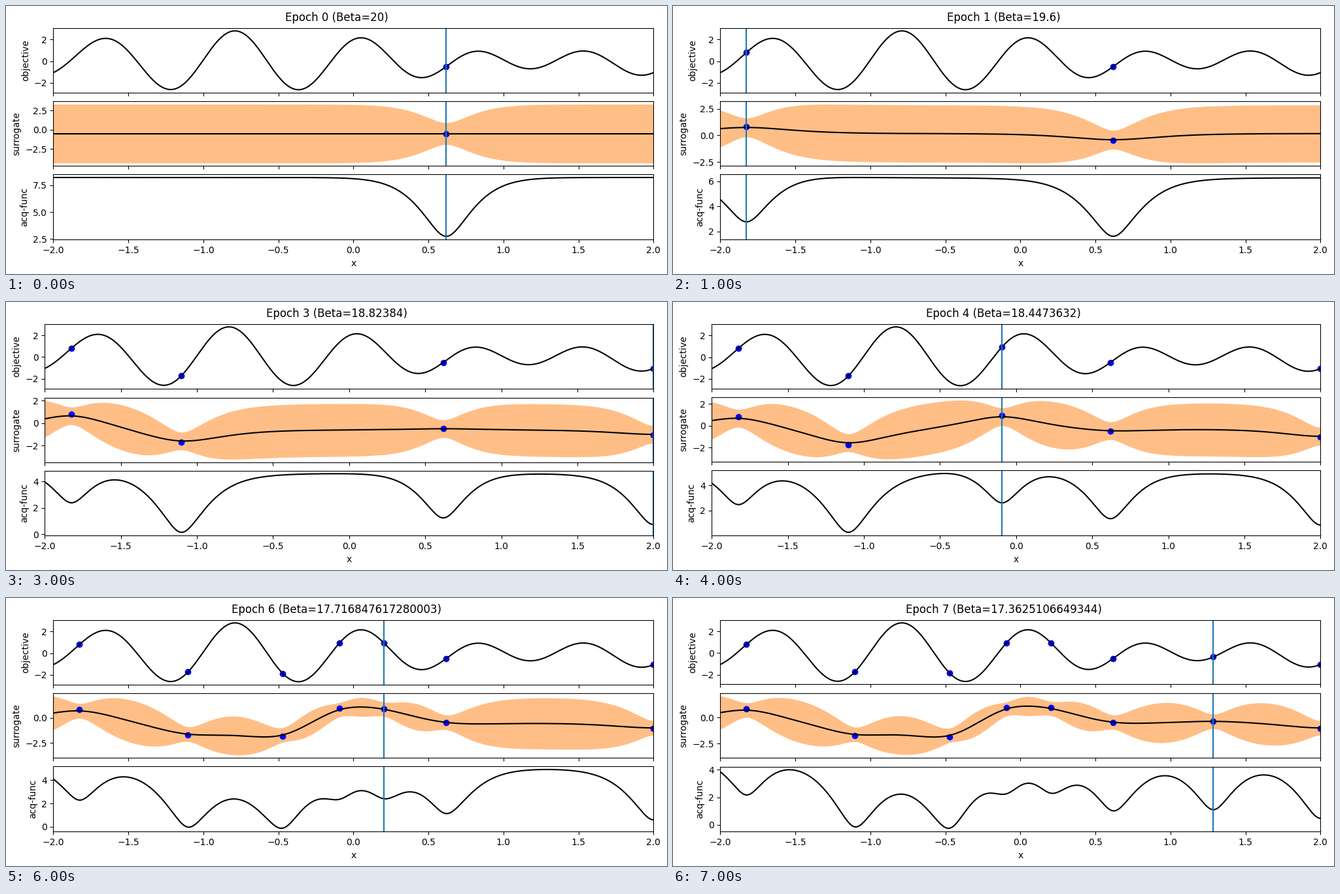
Write a matplotlib script that moves like this. It is 1011 by 411 pixels and loops after 8000 ms.

```python
import numpy as np
import matplotlib.pyplot as plt
from matplotlib.animation import FuncAnimation

W, H, DPI = 1011, 411, 100
EPOCHS = 8
grid = np.linspace(-2, 2, 1000)
samples = np.array([0.6187, -1.8257, -1.1024, 2.0, -0.092, -0.4706, 0.2048, 1.2854])


def objective(x):
    return np.sin(2 * np.pi * x) + np.cos(7.275 * x) + np.cos(8.285 * x)


def matern(a, b, length):
    r = np.sqrt(5) * np.abs(a[:, None] - b[None, :]) / length
    return (1 + r + r * r / 3) * np.exp(-r)


def solve_gp(params, x, y):
    """Noisy covariance and best constant mean for log hyperparameters."""
    scale, length, noise = np.exp(params)
    cov = scale * matern(x, x, length) + noise * np.eye(len(x))
    weights = np.linalg.solve(cov, np.ones(len(x)))
    return cov, weights @ y / weights.sum()


def log_posterior(params, x, y):
    cov, mean = solve_gp(params, x, y)
    scale, length, noise = np.exp(params)
    res = y - mean
    fit = -0.5 * (res @ np.linalg.solve(cov, res) + np.linalg.slogdet(cov)[1])
    # Gamma priors on scale, length and noise
    prior = (params[0] - 0.15 * scale + 2 * params[1] - 6 * length
             + 0.1 * params[2] - 0.05 * noise)
    return fit + prior


def fit_gp(x, y):
    """Compass search for the most probable hyperparameters."""
    best = np.log([2.0, 0.4, 0.5])
    score = log_posterior(best, x, y)
    step = 0.4
    while step > 2e-4:
        improved = False
        for move in np.vstack([np.eye(3), -np.eye(3)]) * step:
            trial = log_posterior(best + move, x, y)
            if trial > score:
                best, score, improved = best + move, trial, True
        if not improved:
            step /= 2
    return best


def posterior(x, y):
    params = fit_gp(x, y)
    cov, mean = solve_gp(params, x, y)
    scale, length, _ = np.exp(params)
    cross = scale * matern(grid, x, length)
    mu = mean + cross @ np.linalg.solve(cov, y - mean)
    var = scale - np.sum(cross * np.linalg.solve(cov, cross.T).T, axis=1)
    return mu, np.sqrt(var)


values = objective(samples)
models = [posterior(samples[:n], values[:n]) for n in range(1, EPOCHS + 1)]
betas = [20]
while len(betas) < EPOCHS:
    betas.append(betas[-1] * 0.98)

# Area for the three panels, in pixels; the title sits above it
LEFT, BOTTOM, WIDTH, TOP = 5.5, 5.17, 1000, 29.5
TITLE_BASELINE = 23

fig = plt.figure(figsize=(W / DPI, H / DPI), dpi=DPI, layout="constrained")
fig.get_layout_engine().set(
    rect=(LEFT / W, BOTTOM / H, WIDTH / W, (H - TOP - BOTTOM) / H))


def draw(epoch):
    fig.clear()
    fig.suptitle(f"Epoch {epoch} (Beta={betas[epoch]})", va="baseline",
                 x=(LEFT + WIDTH / 2) / W, y=1 - TITLE_BASELINE / H)
    top, middle, bottom = axes = fig.subplots(3, 1, sharex=True)
    x, y = samples[:epoch + 1], values[:epoch + 1]
    mu, sigma = models[epoch]

    top.plot(grid, objective(grid), color="black")
    middle.plot(grid, mu, color="black")
    middle.fill_between(grid, mu - 1.96 * sigma, mu + 1.96 * sigma,
                        color="tab:orange", alpha=0.5, linewidth=0)
    bottom.plot(grid, mu + np.sqrt(betas[epoch]) * sigma, color="black")
    for ax in (top, middle):
        ax.scatter(x, y, color="blue")
    for ax, label in zip(axes, ("objective", "surrogate", "acq-func")):
        ax.axvline(x[-1])
        ax.set_ylabel(label)
    bottom.set_xlabel("x")
    bottom.set_xlim(-2, 2)
    bottom.tick_params(axis="x", pad=4)
    return []


anim = FuncAnimation(fig, draw, frames=EPOCHS, interval=1000, repeat=True,
                     repeat_delay=0)
plt.show()
```
